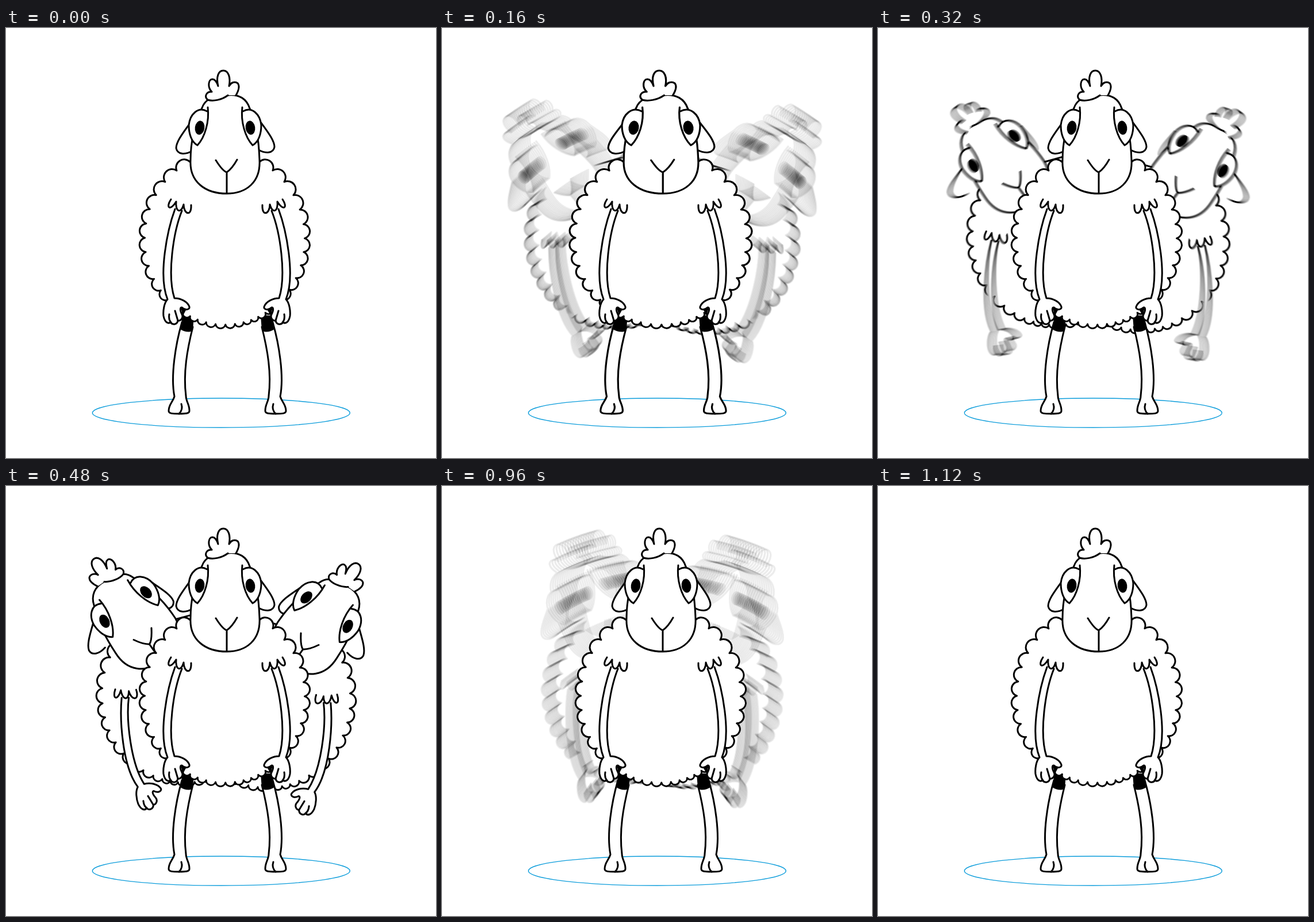
Write an HTML page that moves like this. It is 748 px wide and 748 px high and loops after 1440 ms.

```html
<!DOCTYPE html>
<html lang="en">
<head>
<meta charset="utf-8">
<title>Sheep</title>
<style>
  html, body { margin: 0; width: 100%; height: 100%; overflow: hidden; background: #fff; }
  svg { display: block; width: 100vw; height: 100vh; }
  .ink { fill: #fff; stroke: #000; stroke-width: 3; stroke-linecap: round; stroke-linejoin: round; }
  .line { fill: none; }
  .solid { fill: #000; stroke: none; }
</style>
</head>
<body>
<svg viewBox="0 0 748 748">
  <defs>
    <path id="ear" class="ink" d="M319 167C310 180 296 197 296 209C298 220 311 221 324 214"/>
    <g id="eye">
      <path d="M351 138C354 163 346 190 333 204C322 198 318 183 318 169C320 150 334 136 350 145"/>
      <ellipse class="solid" cx="337" cy="173.5" rx="8.3" ry="12.2" transform="rotate(8 337 173.5)"/>
    </g>
    <g id="skull" class="ink">
      <path d="M341 139C346 124 360 118 384 117C406 114 419 124 424 140C436 165 440 200 441 230C443 268 418 288 384 288C347 288 319 268 321 230C321 200 328 165 341 139Z"/>
      <path class="line" d="M365 230C370 238 378 249 384 251C390 247 397 238 402 229M384 251V287"/>
      <use href="#eye"/>
      <use href="#eye" transform="matrix(-1 0 0 1 762 0)"/>
    </g>
    <path id="curl" class="ink" d="M386 117C376 125 360 128 351 125C344 119 349 110 358 111C350 103 352 89 359 89C364 89 367 95 369 101C365 84 370 74 378 74C387 74 391 86 388 101C391 95 398 92 403 96C407 101 404 110 400 117"/>
    <g id="arm" class="ink">
      <path d="M294 315C281 350 264 430 281 472C275 478 273 492 274 501C276 512 282 515 286 512C291 518 298 515 299 509C304 510 309 504 306 498C302 490 303 486 306 486C312 492 320 490 319 485C316 476 304 470 293 470C280 430 291 355 306 318"/>
      <path class="line" d="M284 498C283 504 284 509 287 512M294 492L299 509"/>
      <path d="M287 298C277 313 286 319 296 302C294 318 304 325 309 307C309 324 323 329 322 308"/>
    </g>
    <g id="leg" class="ink">
      <path d="M306 512C295 550 286 605 293 641C290 651 283 655 283 666C283 671 290 671 301 671C312 671 320 671 319 665C319 655 313 649 313 640C308 600 315 560 325 520"/>
      <path class="solid" d="M307 500L327 500L325 526C319 531 309 528 303 524Z"/>
      <path class="line" d="M301 671C306 666 307 660 305 654"/>
    </g>
    <path id="wool" class="ink"/>
    <path id="gap" class="solid" d="M304 487L314 489L308 500Z"/>
  </defs>
  <rect width="748" height="748" fill="#fff"/>
  <g id="ghosts"></g>
  <ellipse cx="374.3" cy="669.5" rx="224" ry="25.5" fill="none" stroke="#0d9ddb" stroke-width="1.3"/>
  <g id="legs">
    <use href="#leg"/>
    <use href="#leg" transform="matrix(-1 0 0 1 770 0)"/>
  </g>
  <use id="body" href="#wool"/>
  <use href="#gap"/>
  <use href="#gap" transform="matrix(-1 0 0 1 768 0)"/>
  <use href="#arm"/>
  <use href="#arm" transform="matrix(-1 0 0 1 768 0)"/>
  <g id="face"></g>
</svg>
<script>
const LOOP = 1440, STEP = 40, SAMPLES = 16;
const byId = id => document.getElementById(id);

// Curls around an ellipse, from one side of the neck to the other, smaller towards the bottom.
function woolPath(curls = 36, neck = 0.45) {
  let path = "", last;
  for (let i = 0; i <= curls; i++) {
    const u = i / curls;
    const wobble = 0.005 * Math.sin(7 * i) * Math.sin(Math.PI * u);
    const around = u + 0.3 * Math.sin(2 * Math.PI * u) / (2 * Math.PI) + wobble;
    const angle = neck + (2 * Math.PI - 2 * neck) * around;
    const x = 380.5 - 139 * Math.sin(angle), y = 367 - 149 * Math.cos(angle);
    const r = last && Math.hypot(x - last.x, y - last.y) * 0.51;
    path += last ? `A${r} ${r} 0 0 0 ${x} ${y}` : `M${x} ${y}`;
    last = { x, y };
  }
  return path + "Z";
}
byId("wool").setAttribute("d", woolPath());

const head = `<g class="ear"><use href="#ear"/></g>
  <g class="ear2"><use href="#ear" transform="matrix(-1 0 0 1 763 -2)"/></g>
  <use href="#skull"/><use class="curl" href="#curl"/>`;
const sheep = `<use class="body" href="#wool"/>
  <g class="arm"><use href="#arm" transform="matrix(-1 0 0 1 768 0)"/></g>
  <g class="head">${head}</g>`;
byId("face").innerHTML = head;

// Each sample covers the stage, so opacity 1/n yields an even average.
byId("ghosts").innerHTML = Array.from({ length: SAMPLES }, (_, i) =>
  `<g opacity="${1 / (i + 1)}"><rect width="748" height="748" fill="#fff"/>
   <g class="pair"><g class="mirror">${sheep}</g><g>${sheep}</g></g></g>`).join("");
const samples = [...byId("ghosts").children];

const bump = (t, from, to) => t > from && t < to ? Math.sin(Math.PI * (t - from) / (to - from)) ** 2 : 0;

// 0 = hidden behind the front sheep, 1 = leaning out.
function lean(t) {
  if (t < 20) return 0;
  if (t < 200) return 1.22 * Math.sin(Math.PI / 2 * (t - 20) / 180) ** 1.5;
  if (t < 460) return 1 + 0.22 * (1 - (t - 200) / 260) ** 3;
  if (t < 920) return 1;
  if (t < 1120) return (1 - (t - 920) / 200) ** 2;
  return 0;
}

function poseSample(root, t) {
  const p = lean(t), fling = bump(t, 160, 400);
  const set = (part, transform) =>
    root.querySelectorAll("." + part).forEach(n => n.setAttribute("transform", transform));
  const turn = `rotate(${15 * p} 384 670)`;
  const flop = -15 * p - 26 * fling;
  const swing = 5 * bump(t, 60, 220) - 12 * fling;
  root.querySelector(".pair").style.display = p < 0.012 ? "none" : "";
  set("body", turn);
  set("arm", `translate(${2 * p} ${27 * p}) ${turn} rotate(${swing} 465 310)`);
  set("head", `translate(${178 * p} ${57 * p * p - 12 * p}) rotate(${35 * p} 380 173)`);
  set("ear", `rotate(${flop} 319 170)`);
  set("ear2", `rotate(${flop} 443 168)`);
  set("curl", `rotate(${24 * fling} 388 118)`);
  set("mirror", `matrix(-1 0 0 1 766 ${-9 * Math.min(1, p * 8)})`);
}

const widen = (id, cx, k) => byId(id).setAttribute("transform", `matrix(${k} 0 0 1 ${cx * (1 - k)} 0)`);

function draw(t) {
  const still = lean(t - STEP / 2) === lean(t + STEP / 2);
  samples.forEach((root, i) => {
    root.style.display = still && i ? "none" : "";
    poseSample(root, still ? t : t + STEP * ((i + 0.5) / SAMPLES - 0.5));
  });
  const squash = bump(t, 40, 280);
  widen("legs", 386, 1 + 0.07 * squash);
  widen("body", 380, 1 + 0.07 * squash);
  widen("face", 381, 1 + 0.08 * squash);
}

let start, shown = -1;
function tick(now) {
  start ??= now;
  const t = Math.floor((now - start) % LOOP / STEP) * STEP;
  if (t !== shown) draw(shown = t);
  requestAnimationFrame(tick);
}
draw(0);
requestAnimationFrame(tick);
</script>
</body>
</html>
```
